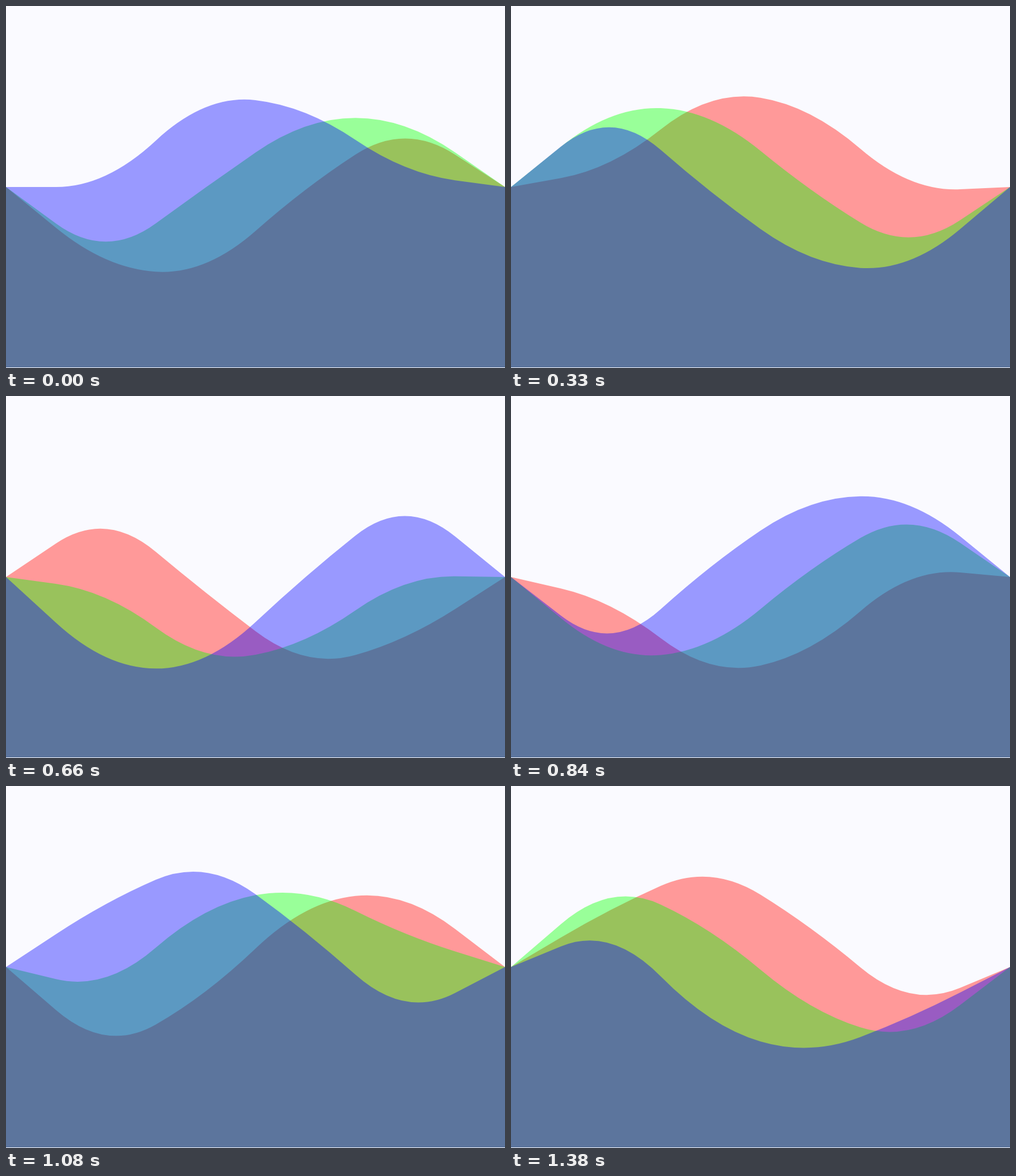
These frames come from a looping animation (878x638 px, 1.41 s). An HTML page with a canvas:

```html
<!DOCTYPE html>
<html lang="en">
<head>
<meta charset="utf-8">
<title>Waves</title>
<style>
  html, body { margin: 0; width: 100%; height: 100%; overflow: hidden; background: #fafaff; }
  canvas { display: block; }
</style>
</head>
<body>
<canvas id="stage" width="878" height="638"></canvas>
<script>
const W = 878, BOTTOM = 637, MID = 319;
const STEP = 30, LOOP = 1410;
const ctx = document.getElementById('stage').getContext('2d');

// Each inner node swings on its own amplitude, one radian ahead of its left neighbour.
const waves = [
  { color: 'rgba(255,0,0,.4)', lag: 2, amps: [158, 184, 177, 135.5] },
  { color: 'rgba(0,255,0,.4)', lag: 1, amps: [152.5, 168, 144.5, 134] },
  { color: 'rgba(0,0,255,.4)', lag: 0, amps: [176, 194, 157, 168] }
];

// Two ticks per step, with two short steps along the way.
function phaseAt(ms) {
  const n = Math.floor((ms % LOOP) / STEP);
  return (2 * n - (n > 16) - (n > 24)) / 10;
}

function wavePath({ lag, amps }, phase) {
  const gap = W / (amps.length + 1);
  const ys = [MID, ...amps.map((a, i) => MID - a * Math.sin(phase - lag + i)), MID];
  const path = new Path2D();
  path.moveTo(0, MID);
  path.lineTo(gap / 2, (ys[0] + ys[1]) / 2);
  for (let i = 1; i <= amps.length; i++) {
    path.quadraticCurveTo(i * gap, ys[i], (i + 0.5) * gap, (ys[i] + ys[i + 1]) / 2);
  }
  path.lineTo(W, MID);
  path.lineTo(W, BOTTOM);
  path.lineTo(0, BOTTOM);
  path.closePath();
  return path;
}

function fill(path, color) {
  ctx.fillStyle = color;
  ctx.fill(path);
}

function draw(ms) {
  const phase = phaseAt(ms);
  const paths = waves.map(w => wavePath(w, phase));
  ctx.fillStyle = '#fafaff';
  ctx.fillRect(0, 0, W, 638);
  paths.forEach(p => fill(p, '#fff'));
  paths.forEach((p, i) => fill(p, waves[i].color));
}

const start = performance.now();
function tick() {
  draw(performance.now() - start);
  requestAnimationFrame(tick);
}
tick();
</script>
</body>
</html>
```
